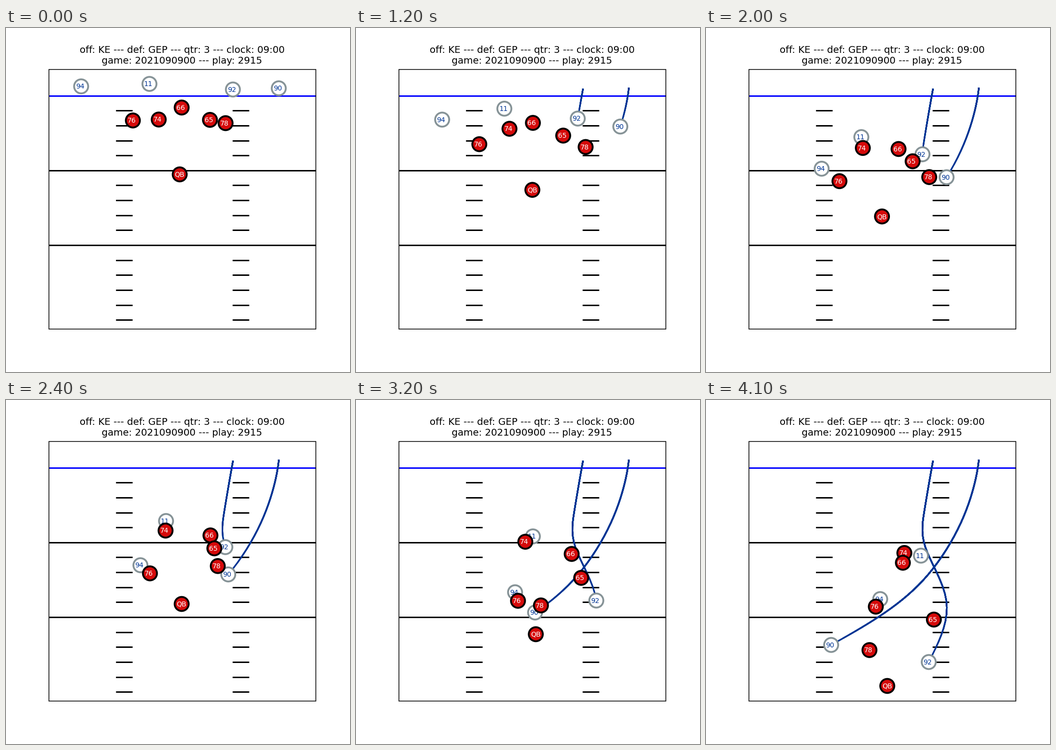
These frames come from a looping animation (705 px wide and 705 px high, 4.2 s). A matplotlib script:

```python
import numpy as np
import matplotlib.pyplot as plt
from matplotlib.animation import FuncAnimation
from matplotlib.collections import LineCollection
from matplotlib.patches import Circle, Rectangle

SIZE, DPI = 705, 100
FRAMES, INTERVAL = 42, 100

LEFT, RIGHT, TOP, BOTTOM = 88, 635, 85, 617
LINE_Y, YARD = 138.6, 30.64
HASH_X, HASH_LENGTH = (225, 464), 34

RED, NAVY, SILVER = "#d50a0a", "#003594", "#869397"

# Each player starts at rest and runs through a few key points (pixels)
KEY_TIMES = np.array([0, 17, 24, 32, 41], float)
DEFENSE = {
    "94": [(154, 119.6), (209, 247.5), (275.5, 338.6), (326, 394), (357, 408)],
    "11": [(294, 114.6), (312.5, 202), (328, 248), (362.5, 279.5), (440.5, 319)],
    "92": [(465, 126), (447, 230.5), (449.5, 301.5), (492.5, 411), (456.5, 537)],
    "90": [(559, 123.6), (516, 265), (455.5, 357.5), (367, 435.5), (256.5, 502)],
}
OFFENSE = {
    "76": [(260, 189.5), (261, 282.5), (295, 355.3), (332, 411.5), (348, 423.5)],
    "74": [(313, 187.6), (318, 228.5), (327, 267.6), (347, 290.5), (406.5, 313.5)],
    "66": [(360, 163), (378, 225.3), (419, 277.5), (442, 315.5), (403.5, 333.5)],
    "65": [(418, 188.3), (425, 251), (427, 304), (461.5, 364.5), (467, 450)],
    "78": [(450, 195), (468.5, 281.5), (434, 340.3), (379, 421), (335, 512.5)],
    "QB": [(356, 300), (362, 363), (360, 418), (368.5, 480), (371.5, 586)],
}
TRAILED = ("92", "90")


def spline(t, points):
    """Cubic spline per frame: at rest at the start, natural at the end."""
    p = np.array(points, float)
    n, h = len(t), np.diff(t)
    slope = np.diff(p, axis=0) / h[:, None]
    a, b = np.eye(n), np.zeros((n, 2))
    for i in range(1, n - 1):
        a[i, i - 1:i + 2] = h[i], 2 * (h[i - 1] + h[i]), h[i - 1]
        b[i] = 3 * (h[i] * slope[i - 1] + h[i - 1] * slope[i])
    a[-1, -2:] = 1, 2
    b[-1] = 3 * slope[-1]
    v = np.linalg.solve(a, b)

    frames = np.arange(FRAMES)
    k = np.clip(np.searchsorted(t, frames, side="right") - 1, 0, n - 2)
    s = ((frames - t[k]) / h[k])[:, None]
    hk = h[k][:, None]
    return ((1 + 2 * s) * (1 - s) ** 2 * p[k] + s * (1 - s) ** 2 * hk * v[k]
            + s ** 2 * (3 - 2 * s) * p[k + 1] + s ** 2 * (s - 1) * hk * v[k + 1])


def hline(x0, x1, y, color="black"):
    ax.plot([x0, x1], [y, y], color=color, lw=2.16,
            solid_capstyle="butt", zorder=1)


class Player:
    def __init__(self, name, points, fill, edge, ink, z):
        self.path = spline(KEY_TIMES, points)
        # Jersey numbers sit slightly left of the centre
        self.dx = -2.2 if name.isdigit() else 0
        self.dot = ax.add_patch(Circle((0, 0), 14.4, fc=fill, ec=edge,
                                       lw=2.7, zorder=z))
        self.label = ax.text(0, 0, name, color=ink, fontsize=10, ha="center",
                             va="baseline", zorder=z + 0.5)
        self.trail = None
        if name in TRAILED:
            self.trail = LineCollection([], colors=NAVY, linewidths=2.16,
                                        capstyle="projecting", zorder=2)
            ax.add_collection(self.trail, autolim=False)

    def move(self, i):
        x, y = self.path[i]
        self.dot.center = x, y
        self.label.set_position((x + self.dx, y + 4.8))
        if self.trail:
            # Overlaid strokes: older parts of the trail look heavier
            self.trail.set_segments([self.path[:k + 1] for k in range(1, i + 1)])


fig = plt.figure(figsize=(SIZE / DPI, SIZE / DPI), dpi=DPI, facecolor="white")
ax = fig.add_axes([0, 0, 1, 1])
ax.set(xlim=(0, SIZE), ylim=(SIZE, 0))
ax.axis("off")

for text, y in [("off: KE --- def: GEP --- qtr: 3 --- clock: 09:00", 51),
                ("game: 2021090900 --- play: 2915", 73)]:
    ax.text(361, y, text, fontsize=14.1, ha="center", va="baseline")

for yard in range(16):
    y = LINE_Y + YARD * yard
    if yard in (0, 5, 10):
        hline(LEFT, RIGHT, y, "black" if yard else "blue")
    else:
        for x in HASH_X:
            hline(x, x + HASH_LENGTH, y)
ax.add_patch(Rectangle((LEFT, TOP), RIGHT - LEFT, BOTTOM - TOP, fill=False,
                       ec="black", lw=1.1, zorder=1.5))

players = []
for team, style in [(DEFENSE, ("white", SILVER, NAVY)),
                    (OFFENSE, (RED, "black", "white"))]:
    for name, points in team.items():
        players.append(Player(name, points, *style, z=3 + len(players)))


def update(i):
    for player in players:
        player.move(i)
    return []


anim = FuncAnimation(fig, update, frames=FRAMES, interval=INTERVAL,
                     repeat=True, repeat_delay=0)
plt.show()
```
